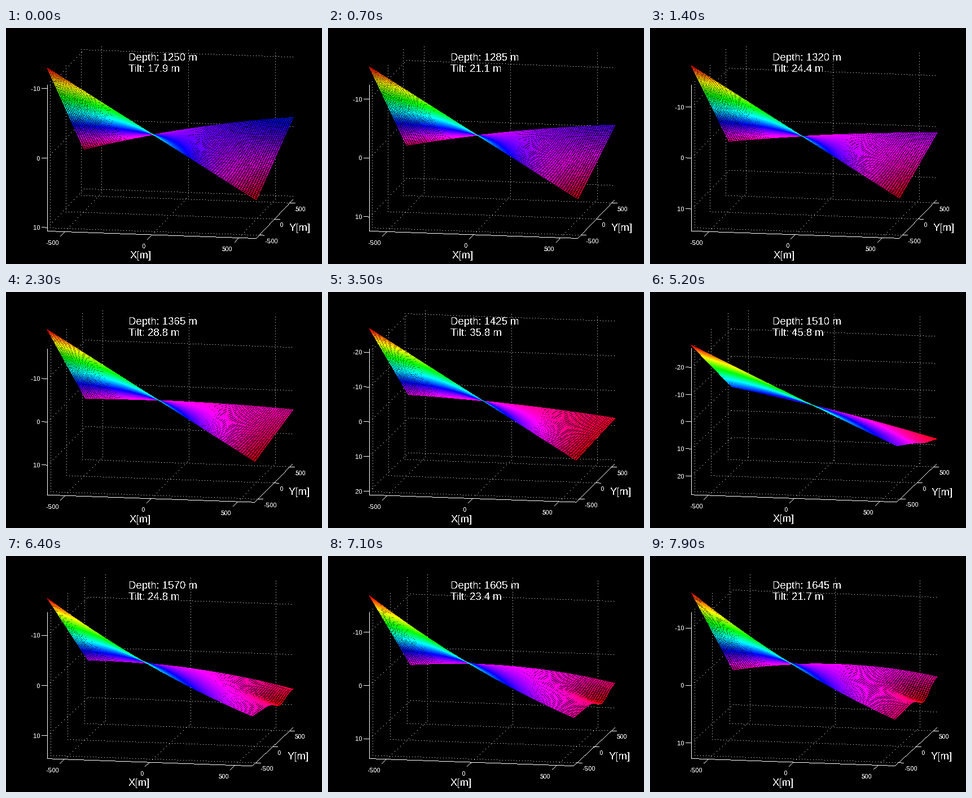
A matplotlib script that plays this animation: 560x420 px, repeating every 8 s.

```python
import numpy as np
import matplotlib.pyplot as plt
from matplotlib.animation import FuncAnimation
from matplotlib.colors import hsv_to_rgb

W, H, FRAMES, STEP = 560, 420, 80, 100
HALF = 130        # half height of the box in pixels
SPAN = 221.4      # height in pixels of the full tilt
NX, NY = 96, 48   # mesh cells
DOT = 5           # spacing of the dotted grid

plt.rcParams["font.family"] = "Liberation Sans"
plt.rcParams["text.antialiased"] = False

# Heights in pixels above the zero plane, at a few moments
KEYS = [0, 14, 23, 35, 52, 64, 79]
TRACKS = {
    "tilt": [17.9, 24.4, 28.8, 35.8, 45.8, 24.8, 21.7],
    "fl": [160, 164, 164, 166, 136, 155, 165],
    "fr": [-61, -58, -57, -55, -30, -41, -47],
    "br": [16, -11, -34, -49, -86, -61, -39],
    "bl": [-53, -39, -27, -20, -6, -23, -40],
    "sag": [0, 0, 0, 0, 1, 14, 16],
    "bow": [8, 4, 4, 4, 4, 11, 16],
    "dent": [0, 0, 0, 0, 3, 13, 20],
}
TICKS = {-500: 1 / 12, 0: 0.5, 500: 11 / 12}
PALETTE = np.round(255 * hsv_to_rgb(
    np.column_stack([np.arange(64) / 64, np.ones(64), np.ones(64)]))).astype(np.uint8)


def mesh_samples():
    """Samples strip by strip, back to front: fill, rows, cross lines.

    Fill and rows are given by screen column, cross lines by mesh coordinate.
    """
    cols = np.arange(70, 512)
    nodes = np.linspace(0, 1, NX + 1)
    parts = []

    def add(a, v, cross, ink):
        a, v = np.meshgrid(a, v)
        parts.append((a.ravel(), v.ravel(),
                      np.full(a.size, cross), np.full(a.size, ink)))

    for k in range(NY, 0, -1):
        hi, lo = k / NY, (k - 1) / NY
        add(cols, np.linspace(hi, lo, 8)[1:-1], False, False)
        add(cols, [hi, lo], False, True)
        add(nodes, np.linspace(hi, lo, 7), True, True)
    return [np.concatenate(p) for p in zip(*parts)]


POS, V, CROSS, INK = mesh_samples()


def put(img, x, y, color):
    x = np.floor(x + 0.5).astype(int)
    y = np.floor(y + 0.5).astype(int)
    ok = (x >= 0) & (x < W) & (y >= 0) & (y < H)
    img[y[ok], x[ok]] = color[ok] if np.ndim(color) == 2 else color


def line(img, p, q, gap=1):
    p, q = np.asarray(p, float), np.asarray(q, float)
    n = max(np.abs(q - p).max(), 1)
    t = np.arange(0, n + 0.01, gap) / n
    put(img, p[0] + t * (q[0] - p[0]), p[1] + t * (q[1] - p[1]), 255)


def state(i):
    s = {name: np.interp(i, KEYS, vals) for name, vals in TRACKS.items()}
    p = i / (FRAMES - 1)
    s["o"] = np.array([73, 231 - p])
    s["x"] = np.array([370 - 9 * p, 13])
    s["y"] = np.array([65 + 9 * p, -69 + p])
    s["p"] = p
    return s


def z_ticks(s):
    scale = SPAN / s["tilt"]
    top = int(HALF / scale // 10) * 10
    return [(z, z * scale) for z in range(-top, top + 1, 10)]


def draw_box(img, s):
    o, x, y = s["o"], s["x"], s["y"]
    up, down = np.array([0, -HALF]), np.array([0, HALF])
    floor = o + down
    for f in TICKS.values():
        line(img, floor + f * x, floor + f * x + y, DOT)
        line(img, floor + f * y, floor + f * y + x, DOT)
        line(img, floor + f * y, o + f * y + up, DOT)
        line(img, floor + y + f * x, o + y + f * x + up, DOT)
        a, b = floor + f * x, floor + x + f * y
        line(img, a, a - y * 8 / abs(y[1]))
        line(img, b, b + x * 9 / x[0])
    for _, dy in z_ticks(s):
        a = o + [0, dy]
        line(img, a, a + y, DOT)
        line(img, a + y, a + y + x, DOT)
        line(img, a, a - [10, 0.4])
    line(img, o + up, floor)
    line(img, floor, floor + x)
    line(img, floor + x, floor + x + y)


def draw_mesh(img, s):
    o, x, y = s["o"], s["x"], s["y"]
    u = np.where(CROSS, POS, (POS - o[0] - V * y[0]) / x[0])
    on = (u >= 0) & (u <= 1)
    u, v, ink = u[on], V[on], INK[on]

    arch = 4 * u * (1 - u)
    front = s["fl"] + u * (s["fr"] - s["fl"]) - s["sag"] * arch
    back = s["bl"] + u * (s["br"] - s["bl"]) + s["bow"] * arch
    # Dip of the middle that lets all rows cross in one point
    twist = (s["fl"] - s["fr"] - s["bl"] + s["br"]) * y[0] / x[0]
    dent = np.exp(-((v - 0.68) / 0.17) ** 2 - ((1 - u) / 0.13) ** 2)
    h = front + v * (back - front) - twist * v * (1 - v) * arch - s["dent"] * dent

    c = (h.max() - h) / (h.max() - h.min())
    rgb = PALETTE[np.minimum((c * 64).astype(int), 63)]
    rgb[~ink] = 0
    put(img, o[0] + u * x[0] + v * y[0], o[1] + u * x[1] + v * y[1] - h, rgb)


fig = plt.figure(figsize=(W / 100, H / 100), dpi=100, facecolor="black")
ax = fig.add_axes([0, 0, 1, 1])
ax.axis("off")
view = ax.imshow(np.zeros((H, W, 3), np.uint8), extent=(0, W, H, 0),
                 interpolation="nearest", aspect="auto")
ax.set_xlim(0, W)
ax.set_ylim(H, 0)


def label(size, ha="left", text=""):
    return ax.text(0, 0, text, color="white", fontsize=size * 0.72, ha=ha, va="baseline")


depth, tilt = label(18.7), label(18.7)
depth.set_position((217, 58))
tilt.set_position((217, 78))
x_name, y_name = label(18.5, text="X[m]"), label(18.5, text="Y[m]")
x_labels = [label(11.2, "right", str(v)) for v in TICKS]
y_labels = [label(11.2, "left", str(v)) for v in TICKS]
z_labels = [label(11.2, "right") for _ in range(5)]


def place(text, x, y):
    text.set_position((round(x), round(y)))


def update(i):
    s = state(i)
    img = np.zeros((H, W, 3), np.uint8)
    draw_box(img, s)
    draw_mesh(img, s)
    view.set_data(img)

    depth.set_text(f"Depth: {1250 + 5 * i} m")
    tilt.set_text(f"Tilt: {s['tilt']:.1f} m")
    place(x_name, 220 - 3.4 * s["p"], 410 - s["p"])
    place(y_name, 502.4 - 4.6 * s["p"], 361 + s["p"])
    floor = s["o"] + [0, HALF]
    for f, tx, ty in zip(TICKS.values(), x_labels, y_labels):
        a, b = floor + f * s["x"], floor + s["x"] + f * s["y"]
        place(tx, a[0] - 9.7, a[1] + 24)
        place(ty, b[0] + 10.5, b[1] + 14.8)
    ticks = z_ticks(s)
    for k, text in enumerate(z_labels):
        text.set_visible(k < len(ticks))
        if k < len(ticks):
            z, dy = ticks[k]
            text.set_text(str(z))
            place(text, 61, s["o"][1] + dy + 4.5)
    return [view]


anim = FuncAnimation(fig, update, frames=FRAMES, interval=STEP,
                     repeat=True, repeat_delay=0, blit=False)
plt.show()
```
